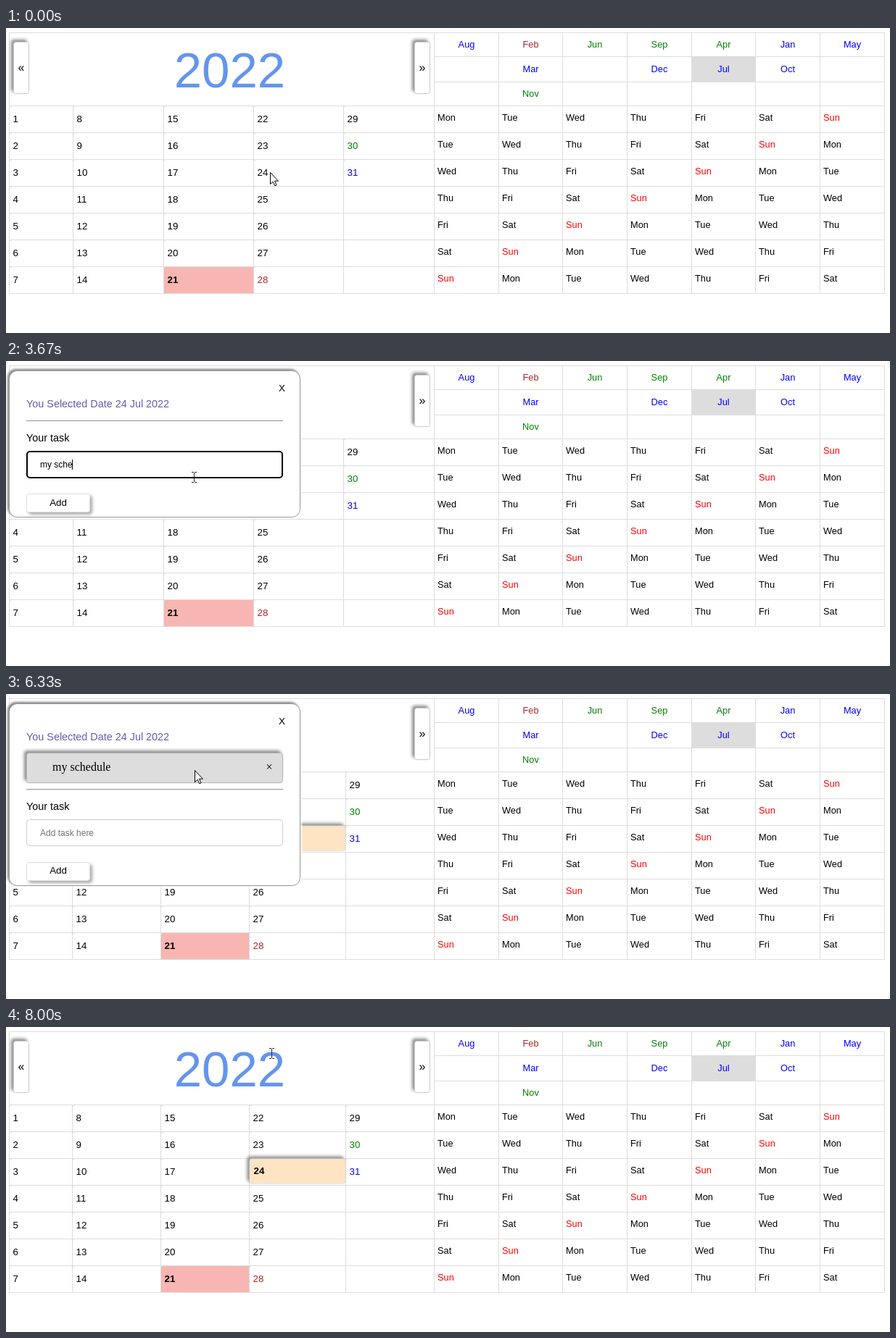
Write an HTML page that moves like this. It is 1219 by 421 pixels and loops after 8870 ms.

```html
<!DOCTYPE html>
<html lang="en">
<head>
<meta charset="utf-8">
<title>Calendar</title>
<style>
html, body { margin: 0; width: 100%; height: 100%; overflow: hidden; background: #fff; }
svg { display: block; width: 1219px; height: 421px; }
text { font-family: "Liberation Sans", Arial, sans-serif; white-space: pre; }
.dark { filter: drop-shadow(-3px -3px 2px #8a8a8a); }
.edge { filter: drop-shadow(-2px -2px 1.5px #858585); }
.glow { filter: drop-shadow(2px 2px 1px #fff); }
.soft { filter: drop-shadow(3px 3px 2px #aaa); }
</style>
</head>
<body>
<svg id="stage" viewBox="0 0 1219 421">
  <defs>
    <linearGradient id="green" x1="0" y1="0" x2="1" y2="1">
      <stop offset="0" stop-color="#ddd"/><stop offset="1" stop-color="#3c9a44"/>
    </linearGradient>
    <linearGradient id="red" x1="0" y1="0" x2="1" y2="1">
      <stop offset="0" stop-color="#e4e0e0"/><stop offset=".6" stop-color="#f9665a"/><stop offset="1" stop-color="#fa6a5c"/>
    </linearGradient>
  </defs>
</svg>
<script>
const LOOP = 8870, OPEN = 400, FOCUS = 1270, ADD = 5870, CLOSE = 7470;
const PHRASE = "my schedule";
const KEYS = [2270, 2530, 2730, 3000, 3200, 3530, 3670, 3870, 4070, 4270, 4400];

const text = (x, y, s, size, fill = "#000", extra = "") =>
  `<text x="${x}" y="${y}" font-size="${size}" fill="${fill}" ${extra}>${s}</text>`;
const box = (x, y, w, h, r, fill, stroke = "none", extra = "") =>
  `<rect x="${x}" y="${y}" width="${w}" height="${h}" rx="${r}" fill="${fill}" stroke="${stroke}" ${extra}/>`;
const path = (d, stroke = "#ddd", fill = "none", extra = "") =>
  `<path d="${d}" stroke="${stroke}" fill="${fill}" ${extra}/>`;
const MID = 'text-anchor="middle"', BOLD = 'font-weight="bold"';

const rows = [6.5, 39.5, 74.5, ...Array.from({ length: 8 }, (_, i) => 107.5 + 37 * i)];
const cols = [590.5, 679.5, 767.5, 856.5, 945.5, 1033.5, 1122.5, 1211.5];

function months() {
  const names = [
    ["Aug", "Feb", "Jun", "Sep", "Apr", "Jan", "May"],
    ["", "Mar", "", "Dec", "Jul", "Oct", ""],
    ["", "Nov"]
  ];
  const tint = { Feb: "brown", Jun: "green", Sep: "green", Apr: "green", Nov: "green" };
  return names.map((row, r) => row.map((name, c) =>
    text((cols[c] + cols[c + 1]) / 2, 27 + 34 * r, name, 12.8, tint[name] || "#00f", MID)).join("")).join("");
}

function weekdays() {
  const names = ["Mon", "Tue", "Wed", "Thu", "Fri", "Sat", "Sun"];
  let out = "";
  for (let r = 0; r < 7; r++) for (let c = 0; c < 7; c++) {
    const name = names[(r + c) % 7];
    out += text(cols[c] + 4.5, 128 + 37 * r, name, 12.8, name === "Sun" ? "red" : "#000");
  }
  return out;
}

function nav(x, sign) {
  return box(x + .5, 19.5, 21, 71, 3, "#fff", "#ccc", 'class="dark"') + text(x + 11, 60, sign, 16, "#000", MID);
}

function dates(edges, marked) {
  const tint = { 28: "brown", 30: "green", 31: "#00f" };
  let out = box(edges[2] + .5, 330, edges[3] - edges[2] - 1, 36, 0, "#f7b6b2");
  out += path(edges.slice(1).map(x => `M${x} 107.5V366.5`).join(""));
  for (let d = 1; d <= 31; d++) {
    const c = Math.floor((d - 1) / 7), r = (d - 1) % 7;
    const x = edges[c], y = 107.5 + 37 * r, hot = marked && d === 24;
    if (hot) out += box(x + .5, y + .5, edges[c + 1] - x - 1, 34, 3, "#ffe4c4", "#ddd", 'class="dark"');
    else out += path(`M${x} ${y}h3l-3 3z`, "none", "#ddd");
    out += text(x + (hot ? 6 : 5), y + (hot ? 21.5 : 22.5), d, 13.333, tint[d], hot || d === 21 ? BOLD : "");
  }
  return out;
}

const base =
  box(946, 40, 87, 34, 0, "#ddd") +
  path(rows.map((y, i) => `M${i === 1 || i === 2 ? 590 : 4} ${y}H1212`).join("") +
    cols.map(x => `M${x} 6.5V366.5`).join("") + "M4.5 6.5V366.5") +
  months() + weekdays() +
  `<g id="before">${dates([4.5, 92.5, 217.5, 341.5, 465.5, 590.5], false)}</g>` +
  `<g id="after">${dates([4.5, 91.5, 213.5, 335.5, 468.5, 590.5], true)}</g>` +
  nav(10, "«") + nav(563, "»") +
  text(231.7, 82, "2022", 69, "#6495ed");

const popup = `<g id="popup">
  ${box(4.5, 13.5, 401, 202, 11, "#fff", "none", 'class="glow panel"')}
  ${box(4.5, 13.5, 401, 202, 11, "#fff", "#999", 'class="edge panel"')}
  ${text(28, 64, "You Selected Date 24 Jul 2022", 14.4, "#6a5ab0")}
  <g id="close">${box(362, 23, 29, 32, 10, "url(#red)")}</g>
  ${text(380.5, 42, "X", 13.333, "#000", MID + ' id="cross"')}
  <g id="task">
    ${box(28.5, 81.5, 353, 41, 3, "#ddd", "#b4b4b4", 'class="dark"')}
    <g style="--f:0">${text(64, 106, PHRASE, 16, "#000", 'style="font-family:\'Liberation Serif\',\'Times New Roman\',serif"')}
    ${text(363, 106, "×", 16, "#000", MID + ' style="font-family:\'Liberation Serif\',serif"')}</g>
  </g>
  <g id="form">
    ${path("M28 82.5H382", "#909090")}
    ${text(28, 111, "Your task", 14.4)}
    ${box(28.5, 124.5, 353, 37, 4, "#fff", "#ccc", 'id="field"')}
    ${text(47, 147, "", 12, "#000", 'id="value"')}
    ${box(47, 136, 1, 14, 0, "#000", "none", 'id="caret"')}
    ${box(28.5, 183.5, 87, 25, 3, "#fff", "#ddd", 'class="soft"')}
    <g id="hover">${box(28, 183, 87.5, 24.5, 3, "url(#green)")}</g>
    ${text(72, 200, "Add", 13.333, "#000", MID + ' id="add"')}
  </g>
</g>`;

const cursors = `<g id="pointer">
  <g id="arrow">${path("M.5 .5V16.6L4.2 13.2L6.8 18.8L9 17.8L6.5 12.2H11.4Z", "#000", "#fff")}</g>
  <g id="beam">${path("M-3 -6.5H-.5L.5 -5.5L1.5 -6.5H4M.5 -5.5V6.5M-3 7.5H-.5L.5 6.5L1.5 7.5H4", "#222")}</g>
  <g id="hand" transform="translate(-7)">
    ${path("M5.5 13.5V2.4C5.5 .1 8.5 .1 8.5 2.4V7.6C9 6.4 11.3 6.7 11.4 8.2C12 7.3 14 7.6 14.1 9C15 8.4 16.5 9 16.5 10.6V15L14.6 19V22H6.8V19.5L1 13.2C.2 11.2 2 9.8 3.5 11.5Z", "#000", "#fff")}
    ${path("M8.5 7.5V12M11.4 8.5V12M14.1 9.5V12.5", "#000")}
  </g>
</g>`;

const stage = document.getElementById("stage");
stage.insertAdjacentHTML("beforeend", base + popup + cursors);
const $ = id => document.getElementById(id);
const panels = stage.querySelectorAll(".panel");
const show = (id, on) => { $(id).style.display = on ? "" : "none"; };
const ramp = (t, a, b) => Math.min(1, Math.max(0, (t - a) / (b - a)));

// Pointer stops: time, x, y
const stops = [
  [0, 364, 199], [69, 364, 199], [70, 373, 201], [400, 373, 201], [600, 345, 188],
  [850, 283, 166], [1070, 259, 160], [4929, 259, 160], [4930, 409, 126], [5130, 392, 178],
  [5330, 270, 209], [5530, 140, 205], [5730, 86, 189], [5870, 86, 189], [6130, 158, 152],
  [6430, 310, 82], [6730, 397, 47], [7000, 382, 40], [7400, 373, 32], [7670, 373, 32],
  [8000, 366, 36], [LOOP, 366, 36]
];

function pointerAt(t) {
  const i = Math.max(1, stops.findIndex(s => s[0] > t));
  const [a, ax, ay] = stops[i - 1], [b, bx, by] = stops[i];
  const k = ramp(t, a, b);
  return [ax + (bx - ax) * k, ay + (by - ay) * k];
}

function pointerKind(t, x, y, open, dy) {
  if (!open) return t >= 7670 ? "beam" : "arrow";
  const inside = (l, top, r, bottom) => x >= l && x <= r && y >= top + dy && y <= bottom + dy;
  if (inside(28, 124, 382, 162)) return "beam";
  if (inside(28, 183, 116, 209)) return "hand";
  return "arrow";
}

function draw(t) {
  const added = t >= ADD, open = t >= OPEN && t < CLOSE;
  const dy = added ? 49 : 0;
  show("before", !added);
  show("after", added);
  show("popup", open);
  show("task", added);
  panels.forEach(p => p.setAttribute("height", 202 + dy));
  $("form").setAttribute("transform", `translate(0 ${dy})`);

  const focus = t >= FOCUS && !added;
  const field = $("field"), inset = focus ? 1 : .5;
  field.setAttribute("x", 28 + inset);
  field.setAttribute("y", 124 + inset);
  field.setAttribute("width", 354 - 2 * inset);
  field.setAttribute("height", (added ? 37 : 38) - 2 * inset);
  field.setAttribute("stroke", focus ? "#000" : "#ccc");
  field.setAttribute("stroke-width", 2 * inset);

  const count = added ? 0 : KEYS.filter(k => k <= t).length;
  const value = $("value");
  value.textContent = count ? PHRASE.slice(0, count) : "Add task here";
  value.setAttribute("fill", count ? "#000" : "#757575");
  const last = count ? KEYS[count - 1] : FOCUS;
  show("caret", focus && (t - last) % 1060 < 530);
  const end = count && open ? value.getComputedTextLength() : 0;
  $("caret").setAttribute("x", 47 + Math.floor(end));

  const lit = added ? 0 : ramp(t, 5560, 5720);
  $("hover").setAttribute("opacity", lit);
  $("add").setAttribute("fill", lit > .5 ? "#fff" : "#000");
  $("add").setAttribute("y", added ? 199 : 200);
  const warm = ramp(t, 6790, 6960);
  $("close").setAttribute("opacity", warm);
  $("cross").setAttribute("fill", warm > .5 ? "#f3c9c6" : "#000");
  $("cross").setAttribute("y", warm > .5 ? 44 : 42);

  const [x, y] = pointerAt(t).map(Math.round);
  const kind = pointerKind(t, x, y, open, dy);
  $("pointer").setAttribute("transform", `translate(${x} ${y})`);
  for (const id of ["arrow", "beam", "hand"]) show(id, id === kind);
}

const start = performance.now();
function tick() {
  draw((performance.now() - start) % LOOP);
  requestAnimationFrame(tick);
}
tick();
</script>
</body>
</html>
```
